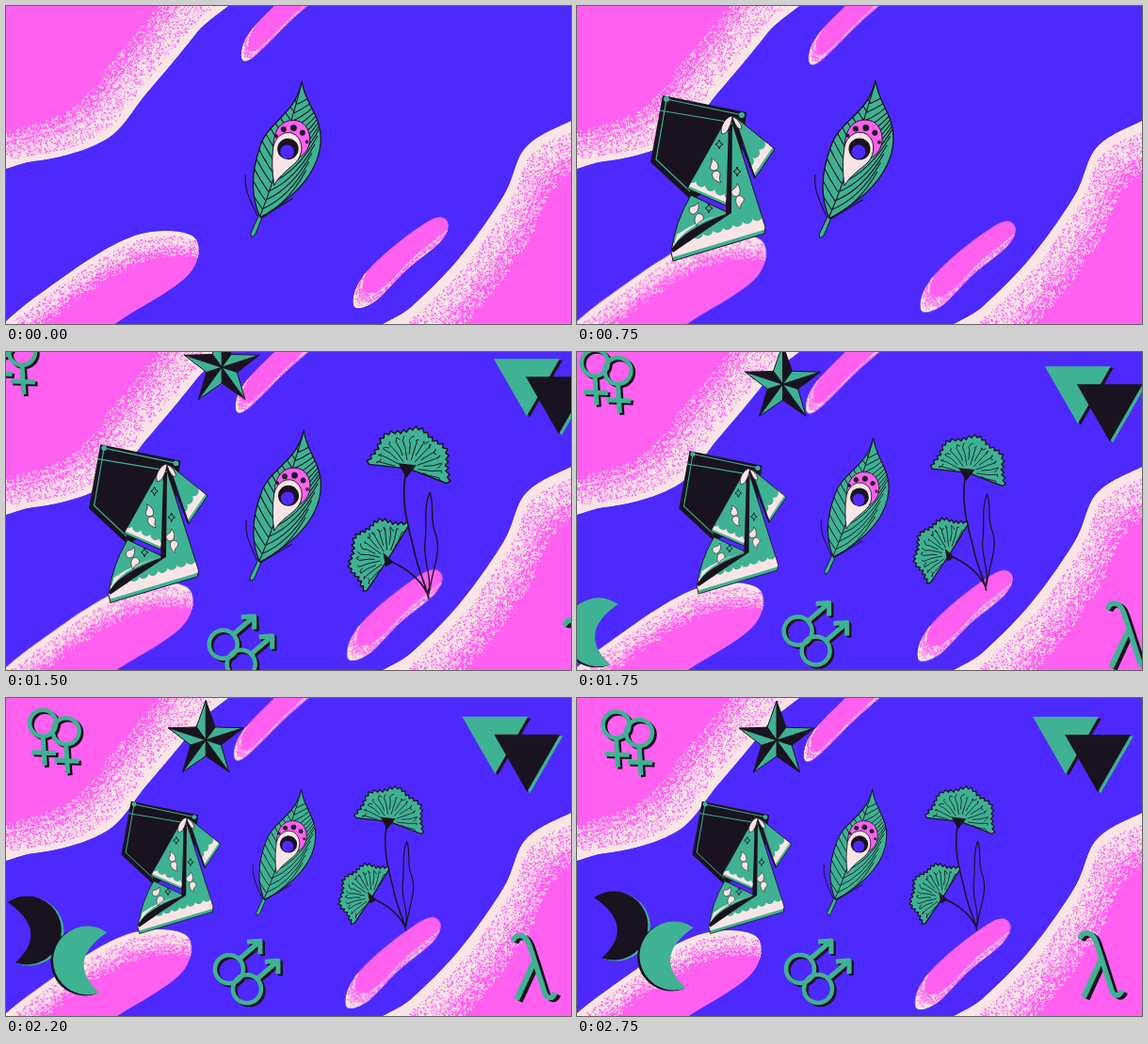
An HTML page with a canvas that plays this animation: 600 px wide and 338 px high, repeating every 2800 ms.

```html
<!DOCTYPE html>
<html lang="en">
<head>
<meta charset="utf-8">
<title>Symbols</title>
<style>
html, body { margin: 0; height: 100%; overflow: hidden; background: #4d29fd; }
canvas { display: block; width: 600px; height: 338px; }
</style>
</head>
<body>
<canvas id="stage" width="600" height="338"></canvas>
<script>
const W = 600, H = 338, PAD = 20, LOOP = 2800, STEP = 50, TAU = Math.PI * 2;
const BLUE = '#4d29fd', PINK = '#ff60f0', CREAM = '#fae5e6', TEAL = '#3fb293', INK = '#19131f';
const ctx = document.getElementById('stage').getContext('2d');

let seed = 11;
const rnd = () => (seed = (seed * 16807) % 2147483647) / 2147483647;
const clamp = x => Math.min(1, Math.max(0, x));
const mix = (a, b, u) => a + (b - a) * u;
const polar = (x, y, r, a) => [x + Math.cos(a) * r, y + Math.sin(a) * r];

function poly(points) {
  const p = new Path2D();
  for (const [x, y] of points) p.lineTo(x, y);
  p.closePath();
  return p;
}

function paint(p, fill, line, width = 1) {
  if (typeof p === 'string') p = new Path2D(p);
  if (fill) { ctx.fillStyle = fill; ctx.fill(p); }
  if (line) { ctx.strokeStyle = line; ctx.lineWidth = width; ctx.stroke(p); }
}

function dot(x, y, r, fill, line, width) {
  const p = new Path2D();
  p.arc(x, y, r, 0, TAU);
  paint(p, fill, line, width);
}

function at(x, y, draw, angle = 0, sx = 1, sy = sx) {
  ctx.save();
  ctx.translate(x, y);
  ctx.rotate(angle);
  ctx.scale(sx, sy);
  draw();
  ctx.restore();
}

// Closed Catmull-Rom curve through the key points
function spline(keys, steps = 16) {
  const n = keys.length, out = [];
  for (let i = 0; i < n; i++) {
    const [a, b, c, d] = [-1, 0, 1, 2].map(k => keys[(i + k + n) % n]);
    for (let s = 0; s < steps; s++) {
      const u = s / steps;
      out.push([0, 1].map(k => b[k] + u / 2 * (c[k] - a[k]
        + u * (2 * a[k] - 5 * b[k] + 4 * c[k] - d[k] + u * (3 * (b[k] - c[k]) + d[k] - a[k])))));
    }
  }
  return out;
}

// Cream shape, covered by a pink copy moved by (dx, dy) with a grainy border
function blob(keys, dx, dy) {
  const g = Object.assign(document.createElement('canvas'), { width: W + 2 * PAD, height: H + 2 * PAD }).getContext('2d');
  const edge = spline(keys), shape = poly(edge);
  g.translate(PAD, PAD);
  g.clip(shape);
  g.fillStyle = CREAM;
  g.fill(shape);
  g.translate(dx, dy);
  g.fillStyle = PINK;
  g.fill(shape);
  const depth = Math.hypot(dx, dy);
  edge.forEach(([x0, y0], i) => {
    const [x1, y1] = edge[(i + 1) % edge.length];
    const count = Math.hypot(x1 - x0, y1 - y0) * depth * .35;
    for (let k = 0; k < count; k++) {
      const u = rnd(), outward = rnd() < .68, size = .7 + rnd() * .9;
      const d = rnd() ** 2 * (outward ? -.75 : .4);
      g.fillStyle = outward ? PINK : CREAM;
      g.fillRect(mix(x0, x1, u) + dx * d, mix(y0, y1, u) + dy * d, size, size);
    }
  });
  return g.canvas;
}

const corner = blob([[-40, -40], [252, -40], [203, 28], [150, 92], [106, 142], [30, 165], [-40, 158]], -28, -23);
const shore = blob([[640, 108], [600, 122], [552, 150], [528, 202], [481, 268], [430, 320], [370, 370], [640, 370]], 20, 32);
const mound = blob([[-10, 350], [65, 285], [140, 243], [199, 245], [195, 284], [132, 327], [70, 360]], 8, 19);
const pill = blob([[469, 230], [452, 227], [404, 262], [374, 295], [370, 320], [392, 314], [425, 281], [462, 250]], 7, -12);
const sliver = blob([[310, -20], [285, 0], [256, 32], [250, 55], [262, 55], [300, 18], [345, -25]], 5, -8);

function paisleys(x, y, angle) {
  for (const k of [-1, 1]) {
    at(x + 2.5 * k, y + 6.5 * k, () => paint('M0-7C4-4 6 1 4 5C2 8-3 7-4 3C-4-1 1-1 0-7Z', CREAM, INK, .6), angle + (k > 0 ? 2.9 : 0));
  }
}

function sparkle(x, y) {
  at(x, y, () => paint('M0-5Q.6-.6 4 0Q.6.6 0 5Q-.6.6-4 0Q-.6-.6 0-5Z', null, INK));
}

// Piece of cloth with a cream band and scallops above the hem from (x0, y0) to (x1, y1)
function cloth(outline, x0, y0, x1, y1, width) {
  const p = new Path2D(outline), len = Math.hypot(x1 - x0, y1 - y0);
  paint(p, TEAL);
  ctx.save();
  ctx.clip(p);
  at(x0, y0, () => {
    ctx.fillStyle = CREAM;
    ctx.fillRect(-9, -width - 3, len + 18, width);
    for (let x = 0; x < len + 9; x += 11) dot(x, -width - 3, 6, TEAL);
  }, Math.atan2(y1 - y0, x1 - x0));
  ctx.restore();
  paint(p, null, INK);
}

function bandana() {
  paint('M91 95L180 113L172 180L121 206L78 166Z', INK);
  paint('M95 99L84 163L120 197M88 111L177 126M95 99L176 116', null, TEAL, 1.2);
  dot(95, 99, 3, TEAL);
  dot(175, 116, 3, TEAL);
  cloth('M167 117L210 152L189 183Z', 189, 183, 210, 152, 13);
  cloth('M160 117L117 194L158 212L164 180Z', 117, 194, 158, 212, 10);
  paisleys(147, 175, -.3);
  sparkle(151, 147);
  cloth('M121 201L159 219Q162 170 163 118L200 235L199 242L102 271L100 262Q104 230 121 201Z', 102, 270, 199, 241, 17);
  paint('M100 259Q112 238 158 221L161 126L165 126L164 220Q132 241 102 262Z', INK);
  paint('M103 255Q114 234 154 221Q126 229 106 243Z', CREAM);
  paint('M163 117C157 120 151 129 154 136C159 137 163 128 165 118C168 127 172 133 175 130C174 124 169 118 163 117Z', CREAM, INK, .8);
  paint('M165 122L189 183', null, INK, 2);
  paisleys(171, 202, .2);
  paisleys(127, 221, .6);
  sparkle(170, 176);
  sparkle(140, 215);
}

const vane = new Path2D('M317 79C320 104 337 116 336 142C335 166 322 196 268 226C256 198 262 170 269 151C277 122 309 116 317 79Z');

function feather() {
  paint('M253 179C251 198 260 211 265 224M304 206C294 211 281 220 268 227', null, INK, 1.1);
  paint('M267 222L257 243L258 247L262 244L271 223Z', TEAL, INK);
  paint(vane, TEAL);
  ctx.save();
  ctx.clip(vane);
  const barbs = new Path2D('M267 226Q287 180 316 84');
  for (let i = 0; i < 14; i++) {
    const x = mix(267, 315, i / 14), y = mix(226, 94, i / 14);
    barbs.moveTo(x - 26, y - 52);
    barbs.quadraticCurveTo(x - 15, y - 22, x, y);
    barbs.quadraticCurveTo(x + 30, y - 12, x + 52, y - 50);
  }
  paint(barbs, null, INK, 1.1);
  ctx.restore();
  paint(vane, null, INK, 1.3);
  paint('M284 152C284 133 292 121 306 121C319 121 325 132 324 144C322 158 312 163 303 165Z', PINK, INK);
  paint('M284 191C282 176 282 164 284 150C287 137 298 131 307 136C317 142 317 157 309 166C301 174 290 180 284 191Z', CREAM, INK);
  for (let i = 0; i < 5; i++) dot(...polar(303, 147, 18, -2.6 + i * .62), 2 + 1.5 * Math.sin(i * .8), INK);
  dot(300, 152, 11.5, INK);
  dot(299, 155, 7.5, BLUE);
}

// Ruffled fan of petals around (x, y)
function bloom(x, y, mid, span, r) {
  const edge = [[x, y]], veins = new Path2D(), n = 44;
  for (let i = 0; i <= n; i++) {
    const u = i / n, a = mid + (u - .5) * span;
    edge.push(polar(x, y, r * (.97 + .05 * Math.cos(u * TAU * 4) + (i % 2 ? .05 : -.03)), a));
    if (i % 3 === 1) {
      veins.moveTo(...polar(x, y, r * (.22 + .14 * (i % 2)), a));
      veins.lineTo(...polar(x, y, r * (.65 + .15 * Math.sin(i * 2.3)), a + .04));
    }
    veins[i % 6 ? 'lineTo' : 'moveTo'](...polar(x, y, r * (.77 + .06 * Math.sin(i * 1.9)), a));
  }
  paint(poly(edge), TEAL, INK, 1.5);
  paint(veins, null, INK);
}

function carnation() {
  paint('M430 128C424 165 436 195 440 215S453 252 456 267M411 224C428 231 445 242 455 262', null, INK, 1.8);
  paint('M455 260C461 243 448 224 452 200C454 180 450 165 457 148C463 166 456 178 464 196C470 215 459 238 456 262', null, INK, 1.4);
  bloom(434, 122, -1.33, 3.4, 45);
  bloom(411, 222, -2.57, 3.1, 43);
  paint('M422 116L442 118L431 132Z', INK);
  paint('M405 215L417 226L408 231Z', INK);
}

// Ink copy below, teal copy above
function raised(draw, dx = 2.5, dy = 2) {
  at(dx, dy, () => draw(INK));
  draw(TEAL);
}

function venus(color) {
  for (const [x, y] of [[41.5, 28.5], [66, 37]]) {
    dot(x, y, 14, null, color, 4.5);
    at(x, y, () => paint('M0 14L2 45M-12 31L14 32', null, color, 5));
  }
}

function mars(color) {
  for (const [x, y] of [[237, 288], [256, 309]]) {
    dot(x, y, 15, null, color, 4.5);
    at(x, y, () => paint('M11-11L32-29M19-29L33-30L33-16', null, color, 5));
  }
}

function star() {
  const point = k => polar(212, 45, k % 2 ? 17 : 42, (k / 5 - .5) * Math.PI);
  for (let k = 0; k < 10; k += 2) {
    paint(poly([[212, 45], point(k), point(k + 1)]), INK, INK);
    paint(poly([[212, 45], point(k), point(k - 1)]), TEAL, INK);
  }
}

function triangles() {
  const shape = 'M0 0L70 0L35 61Z';
  const pair = (x, y, under, over) => {
    at(x + 3, y + 1.5, () => paint(shape, under));
    at(x, y, () => paint(shape, over));
  };
  pair(484, 20, INK, TEAL);
  pair(518, 39, TEAL, INK);
}

function crescent(x, y, side, over, under) {
  const shape = new Path2D();
  shape.arc(0, 0, 36.5, -2.18, 1.92);
  shape.quadraticCurveTo(24, 1, ...polar(0, 0, 36.5, -2.18));
  at(x + 2.5 * side, y + 1, () => paint(shape, under), 0, side, 1);
  at(x, y, () => paint(shape, over), 0, side, 1);
}

function moons() {
  crescent(39, 242, 1, INK, TEAL);
  crescent(103, 274, -1, TEAL, INK);
}

function lambda(color) {
  paint('M534 256C537 247 547 248 551 259C557 276 562 293 567 308C569 317 575 319 579 311', null, color, 5.5);
  paint('M556 279L538 318', null, color, 6);
}

const outCubic = u => 1 - (1 - clamp(u)) ** 3;
const inOutQuad = u => (u = clamp(u)) < .5 ? 2 * u * u : 1 - 2 * (1 - u) ** 2;

// Slide to rest at `end`, with offset (x, y) at time `ref`
function slide(draw, t, ref, end, x, y) {
  const k = (Math.max(0, end - t) / (end - ref)) ** 3;
  at(x * k, y * k, draw);
}

function frame(t) {
  ctx.fillStyle = BLUE;
  ctx.fillRect(0, 0, W, H);
  const drift = (t / 2750) ** .65;
  const put = (img, x, y) => ctx.drawImage(img, x * drift - PAD, y * drift - PAD);
  put(corner, 0, 0);
  put(shore, 0, 0);
  put(sliver, -9, 9);
  put(mound, -9, 8);
  put(pill, -9.5, 10);

  slide(star, t, 1150, 2400, 46, -77);
  slide(() => raised(mars), t, 1150, 2400, -17, 61);
  slide(triangles, t, 1150, 2400, 91, -34);
  slide(() => raised(venus), t, 1500, 2600, -49, -37);
  slide(() => raised(lambda, 3.5, 2), t, 1500, 2700, 59, 35);
  slide(moons, t, 2000, 2850, -37, 11);

  ctx.save();
  const zoom = 1 - .2 * inOutQuad((t - 1190) / 930);
  ctx.translate(300, 169);
  ctx.scale(zoom, zoom);
  ctx.translate(-300, -169);
  at(-225 * (1 - outCubic((t - 200) / 500)), 0, bandana);
  at(245 * (1 - outCubic((t - 750) / 380)), 0, carnation);
  const settle = 1 - outCubic(t / 600);
  at(287, 163, () => at(-287, -163, feather), -.027 * settle, 1 - .023 * settle);
  ctx.restore();
}

ctx.lineJoin = 'round';
const start = performance.now();
function tick() {
  const t = (performance.now() - start) % LOOP;
  frame(Math.floor(t / STEP) * STEP);
  requestAnimationFrame(tick);
}
tick();
</script>
</body>
</html>
```
